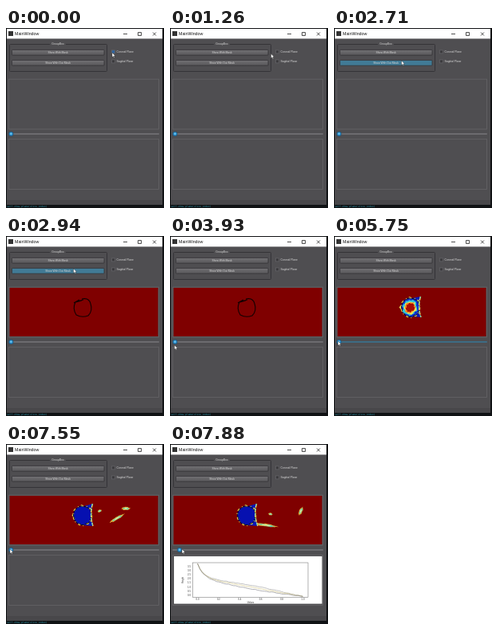
Animation, 198 px wide and 226 px high, one loop 7.99 s. Source, as an HTML page:

```html
<!DOCTYPE html>
<html lang="en">
<head>
<meta charset="utf-8">
<title>MainWindow</title>
<style>
html, body { margin: 0; width: 100%; height: 100%; overflow: hidden; background: #101214; }
svg { display: block; }
text { font: 3.4px "Liberation Sans", Arial, sans-serif; fill: #dcdcdc; }
.mid { text-anchor: middle; }
.title { font-size: 5.3px; fill: #111; }
.dark { fill: #333; font-size: 2.8px; }
.code { font: 3px "DejaVu Sans Mono", monospace; fill: #2c9fb5; }
</style>
</head>
<body>
<svg width="198" height="226" viewBox="0 0 198 226">
  <defs>
    <linearGradient id="btn" x2="0" y2="1">
      <stop stop-color="#727174"/><stop offset="1" stop-color="#58575a"/>
    </linearGradient>
    <clipPath id="view"><rect x="4.5" y="65" width="186" height="61"/></clipPath>
  </defs>

  <!-- window -->
  <rect width="198" height="226" fill="#101214"/>
  <text class="code" x="1" y="225.3">self.show_plane(slice_index)</text>
  <rect x="1" y="1" width="195" height="221" fill="#4f4e51"/>
  <rect x="1" y="216" width="195" height="6" fill="#48474a"/>
  <rect x="1" y="1" width="195" height="12.4" fill="#fff"/>
  <rect x="3" y="4" width="6" height="6" fill="#333"/>
  <text class="title" x="11" y="9.4">MainWindow</text>
  <path d="M147 7.5h5M165.5 5.5h4v4h-4zM184 5.5l4 4m0-4l-4 4" fill="none" stroke="#222" stroke-width=".8"/>

  <!-- controls -->
  <rect x="4.5" y="20.5" width="122" height="34" rx="1" fill="none" stroke="#343337"/>
  <rect x="55" y="18" width="20" height="5" fill="#4f4e51"/>
  <text class="mid" x="65" y="21.2">GroupBox</text>
  <g stroke="#343337" stroke-width=".8">
    <rect id="b1" x="7.4" y="27.4" width="115.6" height="6.8" rx=".8"/>
    <rect id="b2" x="7.4" y="40.4" width="115.6" height="6.8" rx=".8"/>
  </g>
  <g stroke="#656468" stroke-width=".7">
    <rect id="check" x="132.4" y="27.9" width="4" height="4"/>
    <rect x="132.4" y="39.9" width="4" height="4" fill="#3b3a3d"/>
  </g>
  <text class="mid" x="65" y="32">Show With Mask</text>
  <text class="mid" x="65" y="45">Show With Out Mask</text>
  <text x="138.5" y="31.1">Coronal Plane</text>
  <text x="138.5" y="43.1">Sagittal Plane</text>
  <g fill="none" stroke="#656467" stroke-width=".8">
    <rect x="3.5" y="64.2" width="188" height="62.8"/>
    <rect x="3.5" y="139.5" width="188" height="63"/>
  </g>

  <!-- slice view -->
  <g id="scan" clip-path="url(#view)">
    <rect x="4" y="65" width="187" height="61" fill="#7f0000"/>
    <path id="ink" fill="none" stroke="#120000" stroke-width="1.1"
      d="M95 79Q104 77 106 85Q109 94 103 100Q95 103 88 99Q83 91 87 83L97 80M85 84L92 80M88 83L95 81"/>
    <g id="slice"></g>
  </g>

  <rect id="groove" x="3" y="132.2" width="189" height="1.6" rx=".8"/>
  <g id="knob">
    <circle cy="133" r="2.8" fill="#2687c4" stroke="#1a4260" stroke-width=".5"/>
    <circle cy="132.7" r="1.3" fill="#6cc4ee"/>
  </g>

  <g id="chart">
    <rect x="5" y="141" width="185.5" height="59.6" fill="#fff"/>
    <rect x="28.5" y="149" width="144.5" height="43.5" fill="none" stroke="#666" stroke-width=".5"/>
    <g id="plot" fill="none" stroke-width=".5"></g>
    <text class="dark mid" x="101" y="199.6">Values</text>
    <text class="dark mid" transform="translate(17 171) rotate(-90)">Height</text>
  </g>

  <path id="cursor" d="M0 0V5.6L1.4 4.4L2.3 6.3L3.2 5.9L2.3 4H4Z" fill="#fff" stroke="#222" stroke-width=".4"/>
</svg>
<script>
const LOOP = 7990, STEP = 112.5;
const $ = id => document.getElementById(id);
const show = (id, on) => $(id).style.display = on ? '' : 'none';
const fill = (id, colour) => $(id).setAttribute('fill', colour);
const ramp = (t, a, b) => Math.min(1, Math.max(0, (t - a) / (b - a)));
const noise = n => { const v = Math.sin(n * 12.9898) * 43758.5453; return v - Math.floor(v); };
const range = (n, f) => Array.from({ length: n }, (_, i) => f(i));

// Pointer glides: start, end, x, y
const glides = [
  [1150, 1800, 85, 41], [2040, 2140, 84, 32], [2140, 2250, 84.5, 41],
  [2940, 3600, 8, 151], [3600, 3820, 5.5, 137], [3940, 4260, 5, 132], [7540, 7870, 15, 132]
];
function pointer(t) {
  let x = 133, y = 31;
  for (const [a, b, toX, toY] of glides) {
    const k = ramp(t, a, b);
    x += (toX - x) * k;
    y += (toY - y) * k;
  }
  return [x, y];
}

// Ellipse with a ragged edge
function blob(x, y, rx, ry, colour, rough, seed, attrs = '') {
  const points = range(26, i => {
    const a = i * Math.PI / 13, r = 1 + rough * (noise(i + seed) - .5);
    return [x + rx * r * Math.cos(a), y + ry * r * Math.sin(a)].map(v => v.toFixed(2));
  });
  return `<polygon points="${points.join(' ')}" fill="${colour}" ${attrs}/>`;
}

const JET = ['#30c8d8', '#f0e050', '#f08020', '#a80c04'];

function rings(x, y, rx, ry, angle, colours, shrink, rough) {
  return `<g transform="translate(${x} ${y}) rotate(${angle})">` + colours.map((c, i) =>
    blob(0, 0, rx * (1 - i * shrink), ry * (1 - i * shrink), c, rough, i * 40 + 1)).join('') + '</g>';
}

// w: specks appear, u: they spread, v: the tail forms
function drawSlice(t, hot) {
  const w = ramp(t, 5740, 6500), u = ramp(t, 6540, 7530), v = ramp(t, 7540, 7870);
  const speck = (x, y, rx, ry, a) => rings(x, y, rx * w, ry * w, a, ['#e8b838', '#48d0c8', '#f0ec90'], .3, .5);
  const left = 81.5 + u + 1.5 * v, low = 102 + u;
  const edge = `M108.5 ${76 - u}Q104.5 89 ${109 + v} ${low}`;
  const rim = (c, width, dash) =>
    `<path d="${edge}" fill="none" stroke="${c}" stroke-width="${width}" stroke-dasharray="${dash}"/>`;
  return speck(117 + u * .5 + 8.5 * v, 81.5 + 2.5 * u + 4 * v, 2.4, 1 + .5 * u, -20 * u + 30 * v) +
    speck(117 + 22.5 * u - 18.5 * v, 95.5 - 2.5 * u + 9 * v, 2.4 + 7 * u + 3.5 * v, 1 + .7 * u, 38 * v - 30 * u) +
    speck(131 + 19.5 * u + 13.5 * v, 89 - 8 * u + 3 * v, 2.2 + 2.8 * u, 2, -65 * v) +
    `<path d="M${left} 89.5L88 83V97Z" fill="#e8d850"/>` +
    `<path d="${edge}L98 ${low - 1}V78Z" fill="#0818b8"/>` +
    blob(96, 89.5, 11.7, 12.2, hot ? '#0a2fd0' : '#0610b0', .1, 7,
      'stroke="#e8d850" stroke-width="2" stroke-dasharray="3 4 1 3"') +
    blob(96, 89.5, 11.2, 11.7, 'none', .1, 7, 'stroke="#08081c" stroke-width="1" stroke-dasharray="7 1"') +
    rim('#f0dc60', 1.5, '5 1') + rim('#38cfd8', .8, '3 3') +
    (hot ? rings(95.5, 90, 8.6, 9.8, 25, JET, .14, .35) : '');
}

function drawPlot() {
  const line = (c, k) => `<polyline stroke="${c}" points="${range(45, i => {
    const u = i / 44, drop = .42 * (1 - Math.exp(-18 * u)) + .58 * u;
    const spread = (k - 1) * 2.2 * Math.sin(u * Math.PI);
    return [34.5 + 132 * u, 150 + 41 * drop + spread + noise(i + k * 60) * .8];
  }).join(' ')}"/>`;
  const label = (x, y, n) => `<text class="dark mid" x="${x}" y="${y}">${n.toFixed(1)}</text>`;
  return ['#888', '#c8b868', '#66666e'].map(line).join('') +
    range(6, i => label(34.5 + i * 26.4, 196, i / 5)).join('') +
    range(8, i => label(24, 191 - i * 5.2, i / 2)).join('');
}
$('plot').innerHTML = drawPlot();

function render(t) {
  const s = Math.floor(t / STEP) * STEP;
  const [x, y] = pointer(s);
  const over = (top, bottom) => x > 7 && x < 123 && y >= top && y <= bottom;
  $('cursor').setAttribute('transform', `translate(${x} ${y})`);
  fill('b1', over(27, 34.5) ? '#30718e' : 'url(#btn)');
  fill('b2', over(40, 47.5) ? (t >= 2710 ? '#417b96' : '#2c6c88') : 'url(#btn)');
  fill('check', t < 690 ? '#2a62a0' : t < 1260 ? '#34516f' : '#3b3a3d');
  fill('groove', t >= 4260 && t < 6770 ? '#397795' : '#77767a');
  $('knob').setAttribute('transform', `translate(${6.3 + 5.7 * ramp(s, 7540, 7870)})`);
  show('scan', t >= 2940);
  show('ink', t < 5750);
  show('chart', t >= 7770);
  $('slice').innerHTML = t < 5750 ? '' : drawSlice(s, t < 6880);
}

const begin = performance.now();
function frame() {
  render((performance.now() - begin) % LOOP);
  requestAnimationFrame(frame);
}
frame();
</script>
</body>
</html>
```
